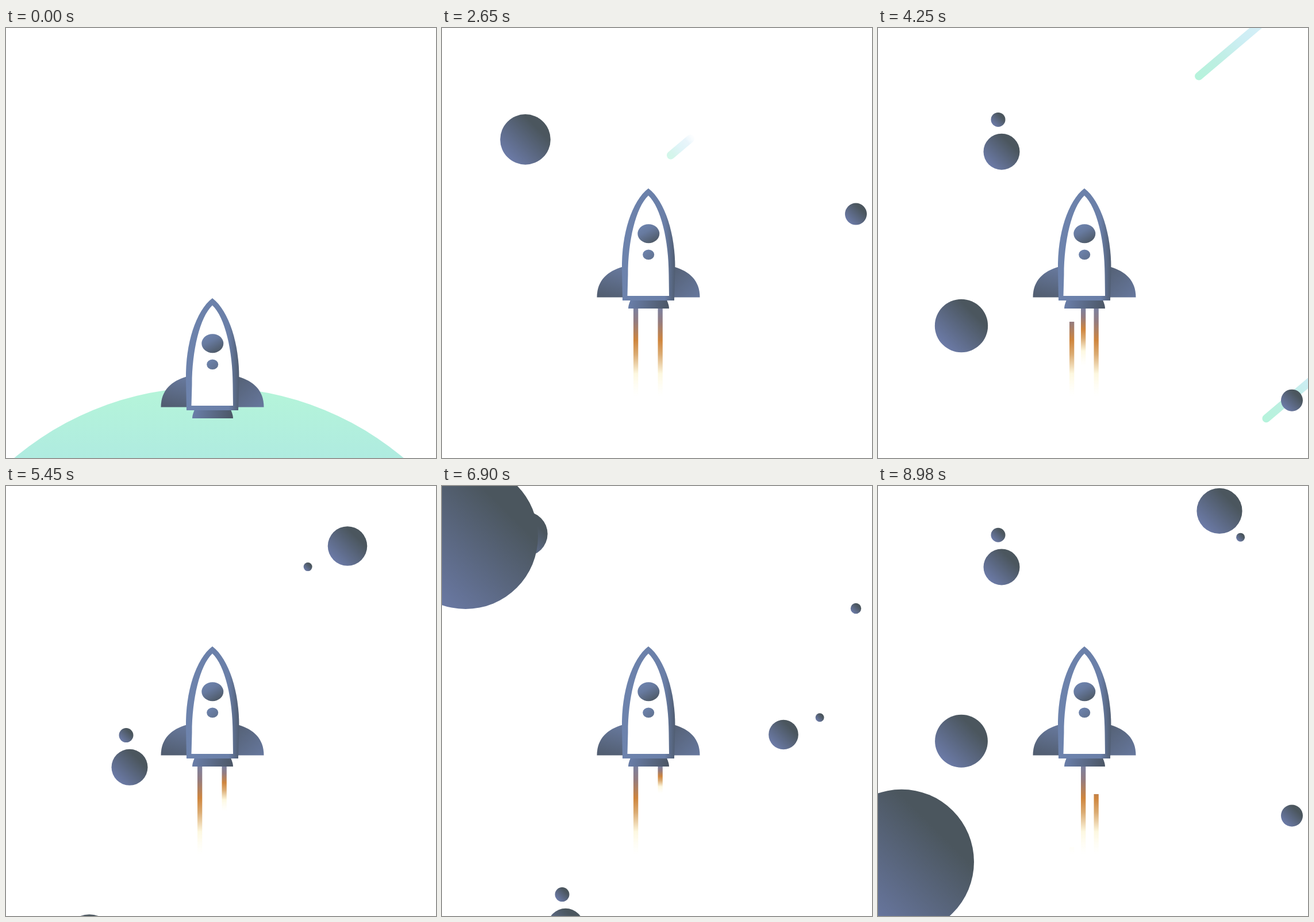
An HTML page with a canvas that plays this animation: 748x748 px, repeating every 9.05 s.

```html
<!DOCTYPE html>
<html lang="en">
<head>
<meta charset="utf-8">
<title>Rocket launch</title>
<style>
  html, body { margin: 0; width: 100%; height: 100%; overflow: hidden; background: #fff; }
  canvas { display: block; width: 748px; height: 748px; }
</style>
</head>
<body>
<canvas id="stage" width="748" height="748"></canvas>
<script>
const ctx = document.getElementById('stage').getContext('2d');
const LOOP = 9050, SIZE = 748;
const clamp = (v, lo = 0, hi = 1) => Math.min(hi, Math.max(lo, v));
const easeInOut = p => p < .5 ? 4 * p ** 3 : 1 - 4 * (1 - p) ** 3;

function gradient(x0, y0, x1, y1, ...stops) {
  const g = ctx.createLinearGradient(x0, y0, x1, y1);
  stops.forEach(([at, color]) => g.addColorStop(at, color));
  return g;
}

function ellipse(x, y, rx, ry, fill) {
  ctx.fillStyle = fill;
  ctx.beginPath();
  ctx.ellipse(x, y, rx, ry, 0, 0, 7);
  ctx.fill();
}

function planet(x, y, r) {
  if (r < .3 || y - r > SIZE || y + r < 0) return;
  const d = r * .72;
  ellipse(x, y, r, r, gradient(x - d, y + d, x + d, y - d, [0, '#6c7ba8'], [.82, '#4b565e']));
}

// Meteors: birth time and place; the tail trails back to the birthplace
const METEORS = [[.5, 748, 27], [.5, 567, 53], [2.567, 435, 190], [3.885, 748, -77], [3.83, 900, 489]];
const SLOPE = .847, TAIL = 172;

function meteor(t, [birth, x, y]) {
  const age = t - birth;
  if (age <= 0 || age > 2) return;
  const dist = 425 * age + 261 * age * age;
  const span = Math.min(dist, TAIL);
  const len = span * Math.hypot(1, SLOPE);
  ctx.save();
  ctx.translate(x - dist, y + dist * SLOPE);
  ctx.rotate(-Math.atan(SLOPE));
  ctx.globalAlpha = clamp(span / 60);
  ctx.fillStyle = gradient(-7, 0, len + 4, 0,
    [0, '#b5f3db'], [.2, '#bdefe2'], [.45, '#cdeef4'], [.75, '#dceff9'], [1, 'rgba(240,248,253,.2)']);
  ctx.beginPath();
  ctx.roundRect(-7, -7, len + 10, 14, 7);
  ctx.fill();
  ctx.restore();
}

// Planets that share one drift: two swell up near the top, two pass by
function driftGroup(t) {
  const age = t - 1.25;
  if (age <= 0) return;
  const y = 615.7 + 600 * Math.sin(.385 * (t - 4.675));
  planet(145, y, 48.5 * age / (age + .15));
  planet(720, y + 129.7, 19 * Math.sin(clamp((age - .05) / 1.1) * Math.PI / 2) ** 2);
  planet(215, y - 302.8, 31.5);
  planet(209, y - 358.5, 12.5);
}

// Shrinking planet with a moon on a tilted ellipse
function moonPair(t) {
  const u = t < 8.4 ? t : t - 3.8;
  const y = 104.5 + 226.2 * (u - 5.45);
  if (y < -60) return;
  const r = 25 + 20.1 * Math.exp(-y / 135);
  const x = t - 5.45, a = (116.8 * x + 3.65 * x * x) * Math.PI / 180;
  const along = (45.4 + .944 * r) * Math.cos(a), across = 58 * Math.sin(a);
  planet(594, y, r);
  planet(594 - .886 * along + .464 * across, y + .464 * along + .886 * across, 7.5);
}

function giant(t) {
  const u = t - 6.9;
  if (u > -.8) planet(41, 88 + 298 * u - 12.5 * u * u, 126);
}

function ground(t) {
  const top = 624.6 + 20.7 * Math.max(0, t - .45) ** 3;
  if (top < SIZE) ellipse(353, top + 527, 527, 527,
    gradient(0, top, 0, top + 125, [0, '#b5f5d9'], [1, '#afebe0']));
}

// Exhaust: grows from the nozzle, holds, then empties from the top
const JETS = [[333, 2.143], [353, 4.089], [375.5, 2.324]];
const JET = 153, NOZZLE = 679;

function jet(t, [x, start], i) {
  let age;
  if (i === 0 && t < 2.5) age = Math.min(t - 1, .4);
  else if (t >= start) age = (t - start) % 1.5;
  if (!(age > 0)) return;
  const len = JET * clamp(age / .247);
  const cut = Math.max(0, (age - .562) * 510);
  if (cut >= len) return;
  ctx.fillStyle = gradient(0, NOZZLE, 0, NOZZLE + len,
    [0, '#7c819f'], [.15, '#947c80'], [.36, '#cf853d'], [.52, '#dbab72'],
    [.74, '#fdf8e0'], [1, 'rgba(255,253,240,0)']);
  ctx.fillRect(x, NOZZLE + cut, 8.3, len - cut);
}

const path = d => new Path2D(d);
const HULL = path('M359 470C330 492 312 550 313 610L314 665H404L405.5 610C406 550 388 492 359 470Z');
const CABIN = path('M359 482.5C337 503 323.5 562 323.5 620L322.5 657H395L394.5 620C394.5 562 381 503 359 482.5Z');
const LEFT_FIN = path('M314 606.5C288 614 269.5 630 269.5 659.5H315Z');
const RIGHT_FIN = path('M404 606.5C430 614 448.5 630 448.5 659.5H403Z');
const BELL = path('M328 664C326 669 324 674 324 679H395C395 674 393 669 391 664Z');

function shape(p, fill) {
  ctx.fillStyle = fill;
  ctx.fill(p);
}

function rocket(t) {
  const dip = clamp((t - .1) / .15) * 1.3;
  const rise = easeInOut(clamp((t - .41) / 1.455));
  ctx.save();
  ctx.translate(0, dip - rise * (191 + dip));
  JETS.forEach((j, i) => jet(t, j, i));
  shape(LEFT_FIN, gradient(305, 610, 292, 662, [0, '#66779a'], [1, '#515d70']));
  shape(RIGHT_FIN, gradient(404, 615, 446, 658, [0, '#566379'], [1, '#66779c']));
  shape(BELL, gradient(330, 665, 390, 681, [0, '#687ca6'], [1, '#4d5868']));
  shape(HULL, gradient(313, 0, 406, 0, [0, '#6d83ad'], [.8, '#6a7fa8'], [1, '#4f5c70']));
  shape(CABIN, '#fff');
  ellipse(359.3, 548.7, 19, 16.5, gradient(350, 533, 368, 566, [0, '#6d83ad'], [.35, '#677a9f'], [1, '#4c5763']));
  ellipse(359.2, 585.3, 10, 8.8, gradient(352, 578, 366, 594, [0, '#6d83ad'], [1, '#60718f']));
  ctx.restore();
}

function draw(t) {
  ctx.clearRect(0, 0, SIZE, SIZE);
  METEORS.forEach(m => meteor(t, m));
  driftGroup(t);
  driftGroup(t - 5.06);
  moonPair(t);
  giant(t);
  ground(t);
  rocket(t);
}

// The picture advances in 50 ms steps, with a slightly late last one
function frame() {
  const ms = performance.now() % LOOP;
  const step = ms >= 8980 ? 8980 : Math.min(8900, Math.floor(ms / 50) * 50);
  draw(step < 150 ? 0 : step / 1000);
  requestAnimationFrame(frame);
}
frame();
</script>
</body>
</html>
```
